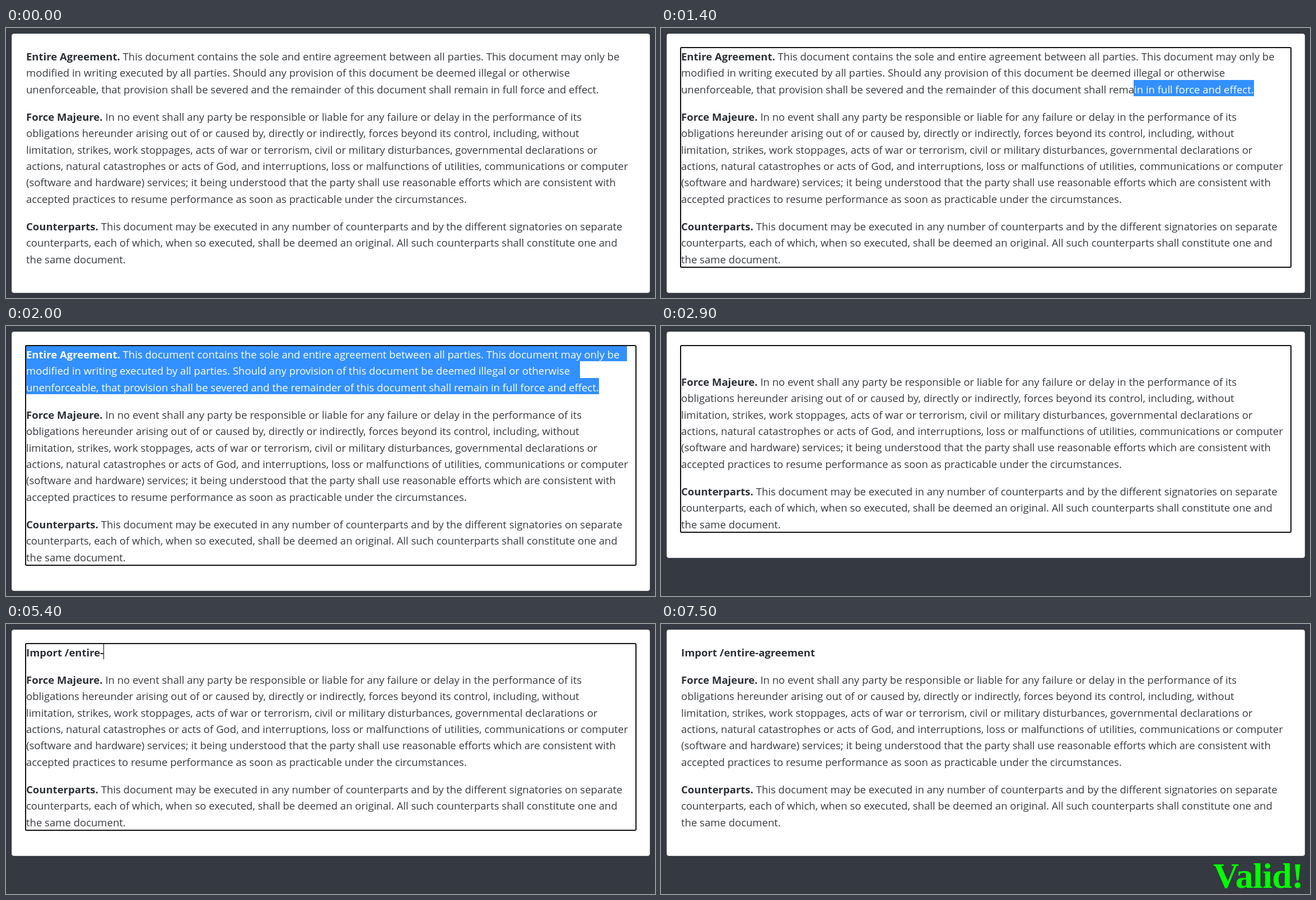
An HTML page for the animation above (8000 ms loop, 1159 px wide and 483 px high).

```html
<!DOCTYPE html>
<html lang="en">
<head>
<meta charset="utf-8">
<title>Agreement editor</title>
<style>
  html, body { margin: 0; width: 100%; height: 100%; overflow: hidden; background: #353941; }
  svg { display: block; width: 1159px; height: 483px; }
  text { font: 18.52px "Open Sans", "Noto Sans", sans-serif; fill: #373b40; white-space: pre; }
  .bold { font-weight: 700; fill: #2c3036; }
  #card { fill: #fff; stroke: #dfdfdf; }
  #ring { fill: none; stroke: #101010; stroke-width: 2; }
  #highlight { fill: #3390ff; }
  #selected text, #selected .bold { fill: #fff; }
  #valid { font: bold 64px "Liberation Serif", "Times New Roman", serif; letter-spacing: -.01em; fill: #0f0; }
</style>
</head>
<body>
<svg viewBox="0 0 1159 483">
  <clipPath id="clip"><path id="clipShape"/></clipPath>
  <rect id="card" x="10.5" y="10.5" width="1139" rx="3.5"/>
  <g id="first"></g>
  <g id="rest"></g>
  <path id="highlight"/>
  <g id="selected" clip-path="url(#clip)"></g>
  <text id="typed" class="bold" x="36" y="58"></text>
  <rect id="caret" y="36" width="1" height="27"/>
  <rect id="ring" x="35" y="35" width="1090" rx="2"/>
  <text id="valid" x="1147" y="472" text-anchor="end">Valid!</text>
</svg>
<script>
const LOOP = 8000, LEFT = 36, SHIFT = 59;
const COMMAND = 'Import /entire-agreement';

const paragraphs = [
  ['Entire Agreement.', [
    ' This document contains the sole and entire agreement between all parties. This document may only be',
    'modified in writing executed by all parties. Should any provision of this document be deemed illegal or otherwise',
    'unenforceable, that provision shall be severed and the remainder of this document shall remain in full force and effect.']],
  ['Force Majeure.', [
    ' In no event shall any party be responsible or liable for any failure or delay in the performance of its',
    'obligations hereunder arising out of or caused by, directly or indirectly, forces beyond its control, including, without',
    'limitation, strikes, work stoppages, acts of war or terrorism, civil or military disturbances, governmental declarations or',
    'actions, natural catastrophes or acts of God, and interruptions, loss or malfunctions of utilities, communications or computer',
    '(software and hardware) services; it being understood that the party shall use reasonable efforts which are consistent with',
    'accepted practices to resume performance as soon as practicable under the circumstances.']],
  ['Counterparts.', [
    ' This document may be executed in any number of counterparts and by the different signatories on separate',
    'counterparts, each of which, when so executed, shall be deemed an original. All such counterparts shall constitute one and',
    'the same document.']]
];

// [time, row, x]: where the selection begins; it always runs to the paragraph's end
const drags = [[1400, 2, 844], [1500, 2, 480], [1600, 1, 170], [1700, 1, LEFT], [2000, 0, LEFT]];
const rowEdges = [36, 63, 93, 122], rowEnds = [1109, 1025, 1059];

// [start, count]: keys typed 100 ms apart
const bursts = [[3600, 1], [3800, 4], [4300, 2], [4600, 7], [5400, 1], [5600, 2], [5900, 2], [6200, 5]];

const el = id => document.getElementById(id);
const show = (id, on) => { el(id).style.display = on ? '' : 'none'; };

function paragraph([title, lines], y) {
  return lines.map((line, i) => {
    const head = i ? '' : `<tspan class="bold">${title}</tspan>`;
    return `<text x="${LEFT}" y="${Math.round(y + i * 29.4)}">${head}${line}</text>`;
  }).join('');
}

function selectionPath(t) {
  const drag = drags.filter(d => t >= d[0]).pop();
  if (!drag || t >= 2900) return '';
  const [, row, x] = drag;
  return rowEnds.map((end, r) => r < row ? '' :
    `M${r === row ? x : LEFT} ${rowEdges[r]}H${end}V${rowEdges[r + 1]}H${r === row ? x : LEFT}Z`).join('');
}

function typedCount(t) {
  return bursts.reduce((sum, [start, count]) =>
    sum + Math.max(0, Math.min(count, Math.floor((t - start) / 100) + 1)), 0);
}

function draw(t) {
  const removed = t >= 2900, shift = removed ? SHIFT : 0;
  show('first', !removed);
  el('rest').setAttribute('transform', `translate(0 ${-shift})`);
  el('card').setAttribute('height', 463 - shift);
  el('ring').setAttribute('height', 393 - shift);
  show('ring', t >= 800 && t < 7500);

  const path = selectionPath(t);
  el('highlight').setAttribute('d', path);
  el('clipShape').setAttribute('d', path);
  show('selected', path);

  const count = typedCount(t), typed = el('typed');
  typed.textContent = COMMAND.slice(0, count);
  const caretOn = count > 0 && t < 7100;
  show('caret', caretOn);
  if (caretOn) el('caret').setAttribute('x', Math.floor(LEFT + typed.getComputedTextLength()));
  show('valid', t >= 7500);
}

el('first').innerHTML = el('selected').innerHTML = paragraph(paragraphs[0], 58);
el('rest').innerHTML = paragraph(paragraphs[1], 165.8) + paragraph(paragraphs[2], 361.8);

const begin = performance.now();
function tick() {
  draw((performance.now() - begin) % LOOP);
  requestAnimationFrame(tick);
}
tick();
</script>
</body>
</html>
```
